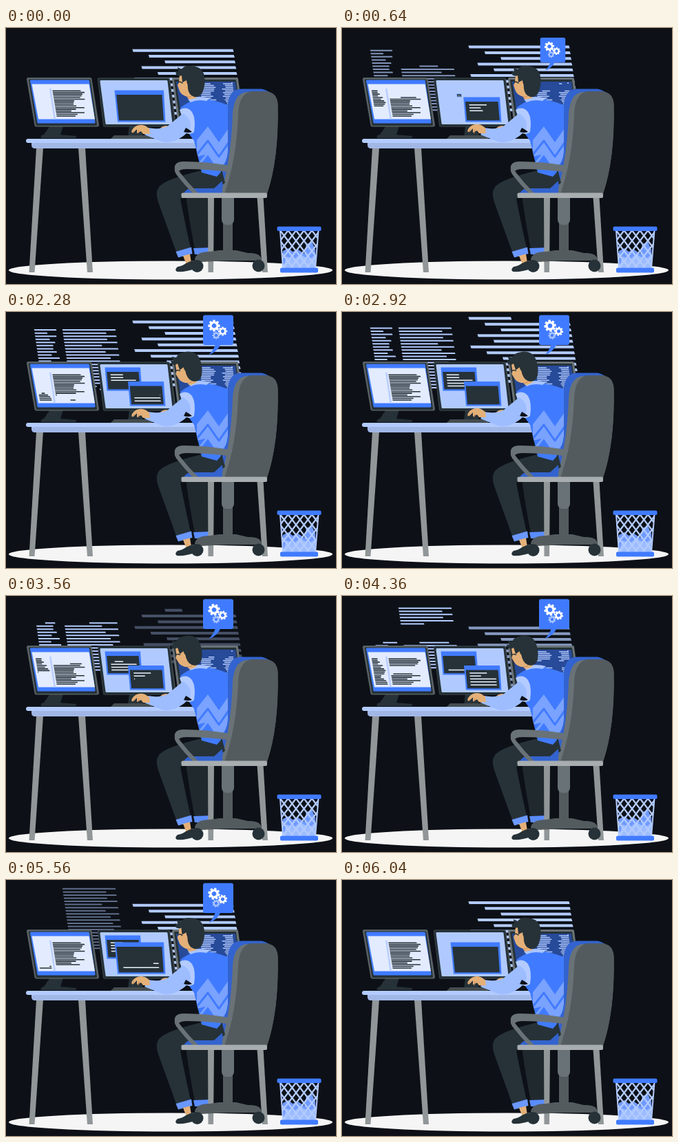
Write an HTML page with a canvas that moves like this. It is 479 px wide and 372 px high and loops after 6080 ms.

```html
<!DOCTYPE html>
<html lang="en">
<head>
<meta charset="utf-8">
<title>Developer at work</title>
<style>
html, body { margin: 0; width: 100%; height: 100%; overflow: hidden; background: #0d1117; }
canvas { display: block; width: 479px; height: 372px; }
</style>
</head>
<body>
<canvas id="stage" width="479" height="372"></canvas>
<script>
const ctx = document.getElementById('stage').getContext('2d');
const LOOP = 6.08, HALF = LOOP / 2, TURN = Math.PI * 2;
const BG = '#0d1117', BLUE = '#407bff', PALE = '#b3cbff', SLEEVE = '#9dbdff';
const INK = '#263238', SKIN = '#e4b078', STEEL = '#919698', IRON = '#697276', SLATE = '#535b5e';

const clamp = v => Math.max(0, Math.min(1, v));
const ramp = (t, a, b) => clamp((t - a) / (b - a));
const smooth = (t, a, b) => { const k = ramp(t, a, b); return k * k * (3 - 2 * k); };
const mix = (a, b, k) => a + (b - a) * k;
const frac = v => v - Math.floor(v);
const noise = i => frac(Math.sin(i * 127.1 + 3.7) * 43758.5);

function shape(d, fill) { ctx.fillStyle = fill; ctx.fill(new Path2D(d)); }
function line(d, color, width) {
  ctx.strokeStyle = color; ctx.lineWidth = width;
  ctx.lineCap = ctx.lineJoin = 'round';
  ctx.stroke(new Path2D(d));
}
function box(x, y, w, h, r, fill) {
  ctx.fillStyle = fill; ctx.beginPath(); ctx.roundRect(x, y, w, h, r); ctx.fill();
}
function disc(x, y, rx, fill, ry = rx) {
  ctx.fillStyle = fill; ctx.beginPath(); ctx.ellipse(x, y, rx, ry, 0, 0, TURN); ctx.fill();
}
// a slanted panel with level top and bottom edges
function panel(x1, x2, y1, x3, x4, y2, fill, r = 0) {
  const d = `M${x1} ${y1}L${x2} ${y1}L${x4} ${y2}L${x3} ${y2}Z`;
  shape(d, fill);
  if (r) line(d, fill, r);
}
// a row of code: the part between fractions a and b
function row(x, y, len, a, b, h, color) {
  if (b <= a) return;
  const l = x + len * a, r = x + len * b, s = h * .16;
  panel(l - s, r - s, y - h / 2, l + s, r + s, y + h / 2, color);
}
// old text is wiped by "gone", new text is written by "made"
function rewrite(x, y, len, i, gone, made, h, color) {
  row(x, y, len, clamp(gone - i), 1, h, color);
  row(x, y, len, 0, clamp(made - i), h, color);
}

function backLeft(t, p) {
  ctx.globalAlpha = smooth(t, .35, .8) * (1 - smooth(t, 5.3, 5.82));
  const top = 30 - 4.05 * (t - 1.32);
  for (let i = 0; i < 20; i++) {
    const y = top + i * 4.55, dx = i * .65;
    const len = i % 2 ? 53 + 17 * noise(i) : 77;
    row(41 + dx, y, 25 + 7 * Math.cos(i * 2.85), clamp((t - HALF) * 8.6 - i), 1, 2, PALE);
    rewrite(82 + dx, y, len, i, p * 8.6, (p - .9) * 13.4, 2, PALE);
  }
  ctx.globalAlpha = 1;
}

function backRight(t) {
  const u = t > 3.85 ? t - LOOP : t;
  ctx.globalAlpha = u < 0 ? smooth(t, 3.9, 4.6) : 1 - smooth(t, 3.1, 3.85);
  for (let i = 0; i < 12; i++) {
    const x = 184 + 57 * frac(i * .41), y = 32.7 - 8 * u + i * 8.3, len = 330 + i * 1.25 - x;
    // rows 3 to 5 are retyped from the bottom up
    if (i > 2 && i < 6) rewrite(x, y, len, 5 - i, (u - .85) * 5.6, (u - 1.45) * 5, 4, PALE);
    else row(x, y, len, 0, 1 - clamp((u - 2.75) * 3.4 - i), 4, PALE);
  }
  ctx.globalAlpha = 1;
}

function rightMonitor(p) {
  panel(243, 335, 74, 252, 344, 142, IRON, 4);
  panel(245, 333, 76, 254, 342, 140, INK, 2);
  panel(247, 333, 78, 256, 341, 138, '#274a99');
  disc(328, 80, 1, PALE);
  for (let i = 0; i < 16; i++) {
    const y = 81 + i * 2.6, dx = i * .35, gone = p * 6.9, made = (p - .6) * 7.6;
    const x = 312 + dx + 6 * noise(i + 30);
    rewrite(281 + dx, y, 14 + 11 * noise(i), i, gone, made, 1.5, PALE);
    rewrite(x, y, 329 + dx - x, i, gone, made, 1.5, PALE);
  }
}

// a code window; lenOf gives each line's length as a share of the width
function codeWindow(x1, x2, y1, x3, x4, y2, gone, made, lenOf) {
  panel(x1, x2, y1, x3, x4, y2, BLUE);
  panel(x1 + 2.7, x2 - 2.5, y1 + 6.5, x3 + 2, x4 - 2.7, y2 - 2.3, INK);
  for (let i = 0; i < 5; i++) {
    const v = .17 + i * .16;
    const x = mix(x1 + 2.7, x3 + 2, v) + (x2 - x1) * .1;
    row(x, mix(y1 + 6.5, y2 - 2.3, v), lenOf(i) * (x2 - x1),
      clamp(gone - i), 1, 1.5, '#eef3ff');
    row(x, mix(y1 + 6.5, y2 - 2.3, v), lenOf(i) * (x2 - x1), 0, clamp(made - i), 1.5, '#eef3ff');
  }
}

function centerMonitor(t, p) {
  panel(179, 196, 142, 177, 199, 158, INK);
  panel(135, 236, 74.5, 143, 245, 141.5, '#4a5459', 4);
  panel(135.5, 235, 75, 143.5, 243.5, 141, INK, 4);
  panel(138, 233, 77.5, 146, 240, 138.5, '#b0caff', 3);

  const open = smooth(t, .55, .95) * (1 - smooth(t, 5.7, 5.95));
  if (open > 0) {
    ctx.save();
    ctx.translate(170, 98); ctx.scale(open, open); ctx.translate(-170, -98);
    codeWindow(143.5, 195, 80.5, 146.5, 197.5, 114.5, p * 3.4 - .45, (p - 1.35) * 3.2,
      i => i < 2 ? .35 : .72);
    ctx.restore();
  }

  const big = 1 - smooth(t, .2, .7) + smooth(t, 4.85, 5.3);
  const top = mix(101, 90.5, big);
  const gone = (p - 1.45) * 3.6, made = p * 3.9;
  codeWindow(mix(177, 157.5, big), 229, top, mix(180, 162, big), 231.5, 136.5, 9, 0, () => 0);
  for (let i = 0; i < 5; i++) {
    const v = .17 + i * .16, width = mix(52, 71, big);
    const x = mix(mix(179.7, 160.2, big), mix(182, 164, big), v) + width * .1;
    row(x, mix(top + 6.5, 134.2, v), width * (i < 2 ? .48 - .17 * i : .73),
      clamp(gone - i), clamp(made - i), 1.5, '#eef3ff');
  }
}

function leftMonitor(p) {
  shape('M64 142L83 142L79 155L101 157Q104 160 100 160L51 160Q49 156 55 155Z', INK);
  panel(32.5, 122, 74.5, 44, 132.5, 141, '#596165', 5);
  panel(34.5, 121, 76, 45, 130.5, 140.5, INK, 3);
  panel(36.5, 119.5, 77, 47, 128, 137, BLUE, 3);
  panel(37.5, 120.5, 81.5, 47, 129, 132.5, '#e3ebff');
  panel(63, 65.5, 88, 69.5, 72, 132.5, '#b9ceff');
  for (let i = 0; i < 16; i++) {
    const y = 91.2 + i * 2.45, dx = i * .4;
    row(43 + dx, y, 8 + 10 * noise(i + 5), clamp((p - 1.46) * 14 - i), clamp(p * 15.5 - i), 1.6, INK);
    rewrite(67.5 + dx, y, 22 + 26 * noise(i + 60), i, p * 6.9, (p - .65) * 7.4, 1.6, INK);
  }
}

function gear(x, y, r, turn, fill) {
  ctx.save();
  ctx.translate(x, y); ctx.rotate(turn);
  disc(0, 0, r * .76, fill);
  for (let i = 0; i < 8; i++) {
    ctx.rotate(TURN / 8);
    box(-r * .2, -r, r * .4, r * .5, .5, fill);
  }
  disc(0, 0, r * .38, BLUE);
  ctx.restore();
}
function bubble(t) {
  const k = smooth(t, .3, .76) * (1 - smooth(t, 5.76, 6));
  if (!k) return;
  ctx.save();
  ctx.translate(296, 61); ctx.scale(k, k); ctx.translate(-296, -61);
  box(286, 4.5, 44, 43.5, 3, BLUE);
  shape('M304 46Q302 55 294.5 62Q307 58 312 46Z', BLUE);
  const turn = t / LOOP * TURN;
  gear(302, 20, 8.6, turn, '#fff');
  gear(314.5, 28, 6.6, -turn, '#fff');
  gear(305, 34, 5.6, turn, '#a9c4ff');
  ctx.restore();
}

function desk() {
  panel(44, 54, 174, 33.5, 41.5, 355, STEEL);
  panel(105, 115, 174, 118, 126, 355, STEEL);
  shape('M37 166H300V175H42Q37 175 37 170Z', '#a1b7e6');
  box(29, 161, 271, 6, 3, PALE);
  panel(157, 215, 156, 152, 212, 161, '#454d50');
}

function chairBack() {
  shape('M322 110Q325 88 342 88.5H371Q384 91 386 100L345 240H296Q318 215 321 170Z', '#3363cf');
  shape('M350 93H376Q394 94 394.5 112Q396 190 379 240H312Q327 190 329 125Q331 94 350 93Z', IRON);
  shape('M355 92H377Q394 93 394.5 112Q396 190 379 241H317Q335 190 337 125Q338 97 355 92Z', SLATE);
}
function seat() {
  shape('M258 241Q261 233 270 233H302L314 222V241Z', '#3363cf');
}
function chairFront() {
  line('M253 201Q243 204 252 214Q262 227 275 240', IRON, 6);
  shape('M245 206Q243 194 258 194Q292 194 324 200L321 209Q290 205 262 205Q252 205 249 210Z', IRON);
  panel(293, 302, 246, 293.5, 301, 355, STEEL);
  panel(364.5, 373.5, 246, 372, 380, 355, STEEL);
  box(254.5, 239.5, 124.5, 7.5, 2, '#a8adb0');
}
function chairBase() {
  box(315, 278, 14, 52, 0, SLATE);
  shape('M313 247H331V279Q330 285 325 286H319Q314 285 313 279Z', IRON);
  shape('M274 336Q276 325 296 325L309 323H334L351 327Q370 326 371 337Q369 340 362 338H322L283 340Q274 341 274 336Z', SLATE);
  disc(277.5, 346, 9, INK);
  disc(366.5, 345.5, 9, INK);
}

function legs() {
  shape('M262 243L300 236Q299 280 296 321L274 322Q266 280 262 250Z', '#20292e');
  shape('M272 320L297 319L295 329L274 329Z', '#5a8cff');
  shape('M314 209L284 207Q232 219 222 231Q216 238 221 253L247 325L268 320Q257 270 253 248L300 236L318 225Z', INK);
  shape('M246.5 325L269 318.5L270.5 328L250 333.5Z', '#6b98ff');
  shape('M257 331L267 328.5L269 341L262 344Z', SKIN);
  shape('M261 342L270 338L276 342L274 350Q260 355 248 354Q244 351 249 347Q256 346 261 342Z', INK);
}

const zigzag = (x, y) => `M${x} ${y}l16 -20l16 23l16 -23`;
function torso() {
  const vest = 'M253 116Q266 106 276 104Q294 101 322 112L322 180Q318 205 306 216L284 210Q278 184 273 164L256 140Z';
  shape(vest, BLUE);
  ctx.save();
  ctx.clip(new Path2D(vest));
  shape(zigzag(277, 163) + 'v40l-16 23l-16 -23l-16 4Z', '#7aa2ff');
  line(zigzag(277, 184), BLUE, 3);
  line(zigzag(277, 202), '#7aa2ff', 3);
  ctx.restore();
  shape('M264 104Q278 97 296 102L291 106Q278 103 268 108Z', '#a9c4ff');
}

function arms(t) {
  const tap = Math.sin(t / LOOP * TURN * 16);
  shape('M222 149Q225 142 233 142L244 147L240 153Z', SKIN);
  shape('M231 148L246 140L258 148L240 156Z', '#8eb0fb');
  shape('M252 119Q262 113 270 122Q276 132 273 151Q267 157 258 151L259 138Z', PALE);
  shape('M206 145Q223 148 234 143L257 124Q268 130 268 142Q266 154 247 163Q236 168 226 165L201 155Z', SLEEVE);
  shape('M261 145Q267 148 270 151Q265 153 258 151Z', BG);
  ctx.save();
  ctx.translate(0, tap * 1.2 - 4);
  shape('M208 150L202 146Q190 142 183 152Q181 157 185 156L190 151L190 157L196 154L199 158L209 158Z', SKIN);
  line(`M186 ${153 + tap}L184 156M193 153L192 ${157 - tap}`, '#c98e5c', 1);
  ctx.restore();
}

function head(t) {
  const nod = smooth(t, .9, 2) - smooth(t, 4.5, 5.8);
  ctx.save();
  ctx.translate(278, 98);
  ctx.rotate(nod * -.23);
  ctx.translate(-278, -98);
  shape('M252 67Q266 66 277 76L276 102L266 104Q263 102 263 100Q253 97 251 89L249 83L251 79Z', SKIN);
  line('M263 100Q268 101 270 98', '#c98e5c', 1);
  line('M250 79Q253 77 256 80', INK, 1.4);
  shape('M247 68L246 62L250 64L249 57L255 60Q259 54 268 55Q282 55 287 66Q291 80 285 94Q281 101 273 100Q265 97 264 88L262 76L256 79L255 69Q251 71 247 68Z', INK);
  disc(260.5, 84, 3.2, SKIN, 4.5);
  ctx.restore();
}

function basket() {
  ctx.save();
  ctx.clip(new Path2D('M397 294H454L449 349H402Z'));
  shape('M401 349L402 324L410 320L416 325L424 322L433 328L436 314L444 311L449 322L450 349Z', '#6f9aff');
  shape('M402 349L407 332L418 336L427 329L440 336L449 330V349Z', SLEEVE);
  for (let x = 351; x < 455; x += 11.5) {
    line(`M${x} 293l44 57M${x + 48} 293l-44 57`, PALE, 2.3);
  }
  ctx.restore();
  line('M398 294L402 349M453.5 294L449 349', PALE, 2);
  box(393.5, 288.5, 64, 6.5, 2, BLUE);
  box(398, 348.5, 55, 7, 2, BLUE);
}

function draw(now) {
  const t = Math.floor(now % 6080 / 40) * .04, p = t % HALF;
  ctx.fillStyle = BG;
  ctx.fillRect(0, 0, 479, 372);
  disc(239, 352, 235, '#f5f5f5', 13.5);
  backLeft(t, p);
  backRight(t);
  rightMonitor(p);
  centerMonitor(t, p);
  leftMonitor(p);
  bubble(t);
  desk();
  chairBack();
  legs();
  seat();
  torso();
  arms(t);
  head(t);
  chairFront();
  chairBase();
  basket();
  requestAnimationFrame(draw);
}
requestAnimationFrame(draw);
</script>
</body>
</html>
```
